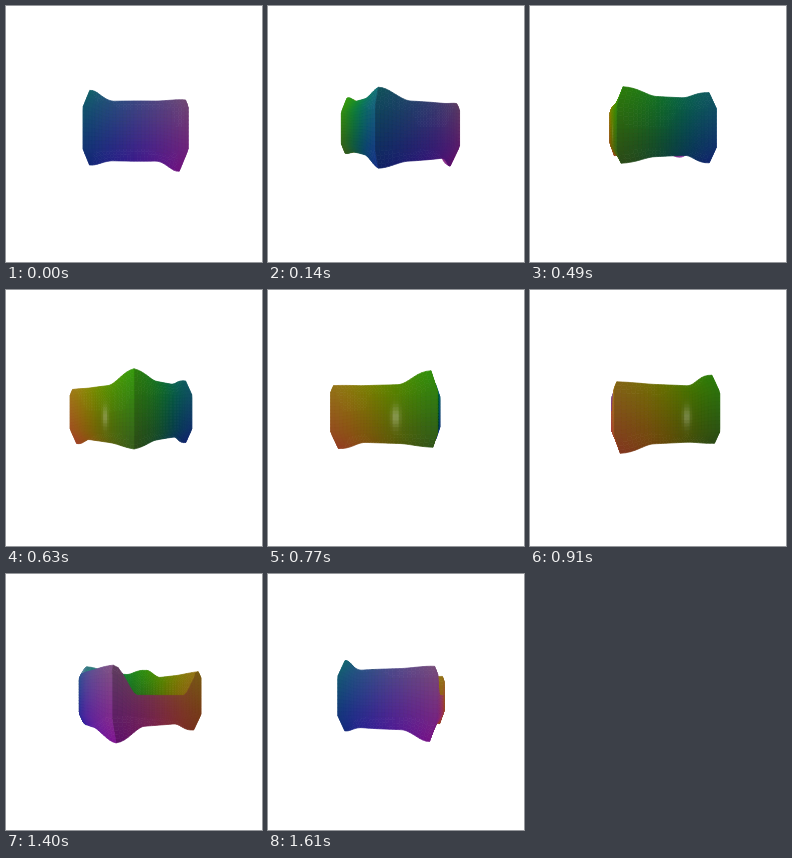
Animation of 256x256 px, one loop 1.68 s. Source, as an HTML page with a canvas:

```html
<!DOCTYPE html>
<html lang="en">
<head>
<meta charset="utf-8">
<title>Turning ring</title>
<style>
  html, body { margin: 0; width: 100%; height: 100%; overflow: hidden; background: #fff; }
  canvas { display: block; width: 256px; height: 256px; }
</style>
</head>
<body>
<canvas id="stage" width="256" height="256"></canvas>
<script>
const ctx = document.getElementById('stage').getContext('2d');
const STEPS = 24, STEP_MS = 70;
const CX = 128, CY = 122, DIST = 208;
const COLS = 120, ROWS = 18;

// Four corners, each followed by the side after it, as heights above and below centre
const corners = [
  { top: 31, bottom: 30.5 },
  { top: 22.5, bottom: 35.5 },
  { top: 22.5, bottom: 31.5 },
  { top: 32, bottom: 27 }
];
const sides = [
  { top: 20.5, bottom: 25.5, spread: 28 },
  { top: 0.5, bottom: 24, spread: 18 },
  { top: 21.5, bottom: 25, spread: 28 },
  { top: 25.5, bottom: 23, spread: 28 }
];

const rad = deg => deg * Math.PI / 180;
const cos = deg => Math.cos(rad(deg));
const sin = deg => Math.sin(rad(deg));
const mix = (a, b, t) => a + (b - a) * t;
const ease = t => t * t * (3 - 2 * t);

// Azimuth -45 is the first corner; corners follow every 90 degrees
function rimAt(az) {
  const turn = (az + 45) / 90;
  const side = sides[Math.floor(turn) % 4];
  const corner = corners[Math.round(turn) % 4];
  const away = Math.abs(turn - Math.round(turn)) * 90;
  const peak = spread => ease(Math.max(0, 1 - away / spread));
  return [
    mix(side.top, corner.top, peak(side.spread)),
    -mix(side.bottom, corner.bottom, peak(26))
  ];
}

// Slightly lopsided square with one bulging side, drawn in towards the rims
function radius(az, h) {
  const off = az - 90 * Math.round(az / 90);
  const section = Math.abs(az) <= 45 ? 60.8 - 6.8 * cos(off * 2) : 43 / cos(off);
  return section + 3 * cos(az - 135) - 0.45 * Math.max(0, Math.abs(h) - 17);
}

const points = Array.from({ length: COLS + 1 }, (_, c) => {
  const az = -45 + c * 360 / COLS;
  const [top, bottom] = rimAt(az);
  return Array.from({ length: ROWS + 1 }, (_, r) => {
    const h = mix(top, bottom, r / ROWS);
    return { az, h, r: radius(az, h) };
  });
});

function project(p, turn) {
  const a = p.az + turn;
  const z = p.r * cos(a);
  const k = DIST / (DIST - z);
  return { x: CX + p.r * sin(a) * k, y: CY - p.h * k, z };
}

// Each channel runs across the solid in its own direction
function colour(az, h, turn, inside) {
  const v = h / 28;
  const base = [
    83 + 72 * cos(az - 107),
    82 + 30 * cos(az - 205) + 28 * v,
    72 + 68 * cos(az - 5) - 6 * v
  ];
  const normal = 90 * Math.round(az / 90) + turn;
  const shade = inside ? 1 : 0.8 + 0.3 * Math.abs(cos(normal + 60));
  const spot = Math.exp(-(((az - 195) / 4) ** 2) - (((h + 4) / 8) ** 2));
  const white = inside
    ? 0.4 * Math.max(0, cos(az)) ** 3
    : 0.32 * spot * Math.max(0, cos(az + turn));
  return `rgb(${base.map(b => Math.round(mix(Math.max(0, b * shade), 255, white)))})`;
}

function draw(turn) {
  ctx.fillStyle = '#fff';
  ctx.fillRect(0, 0, 256, 256);
  const grid = points.map(col => col.map(p => project(p, turn)));
  const quads = [];
  for (let c = 0; c < COLS; c++) {
    for (let r = 0; r < ROWS; r++) {
      const q = [grid[c][r], grid[c + 1][r], grid[c + 1][r + 1], grid[c][r + 1]];
      const area = (q[2].x - q[0].x) * (q[3].y - q[1].y) - (q[2].y - q[0].y) * (q[3].x - q[1].x);
      const p = points[c][r], n = points[c + 1][r + 1];
      quads.push({
        q, z: q[0].z + q[1].z + q[2].z + q[3].z,
        fill: colour((p.az + n.az) / 2, (p.h + n.h) / 2, turn, area < 0)
      });
    }
  }
  quads.sort((a, b) => a.z - b.z);
  ctx.lineWidth = 0.7;
  ctx.lineJoin = 'round';
  for (const { q, fill } of quads) {
    ctx.fillStyle = ctx.strokeStyle = fill;
    ctx.beginPath();
    q.forEach(p => ctx.lineTo(p.x, p.y));
    ctx.closePath();
    ctx.fill();
    ctx.stroke();
  }
}

let shown = -1;
const start = performance.now();
function tick(now) {
  const step = Math.floor(Math.max(0, now - start) / STEP_MS) % STEPS;
  if (step !== shown) {
    shown = step;
    draw(step * 360 / STEPS);
  }
  requestAnimationFrame(tick);
}
tick(start);
</script>
</body>
</html>
```
